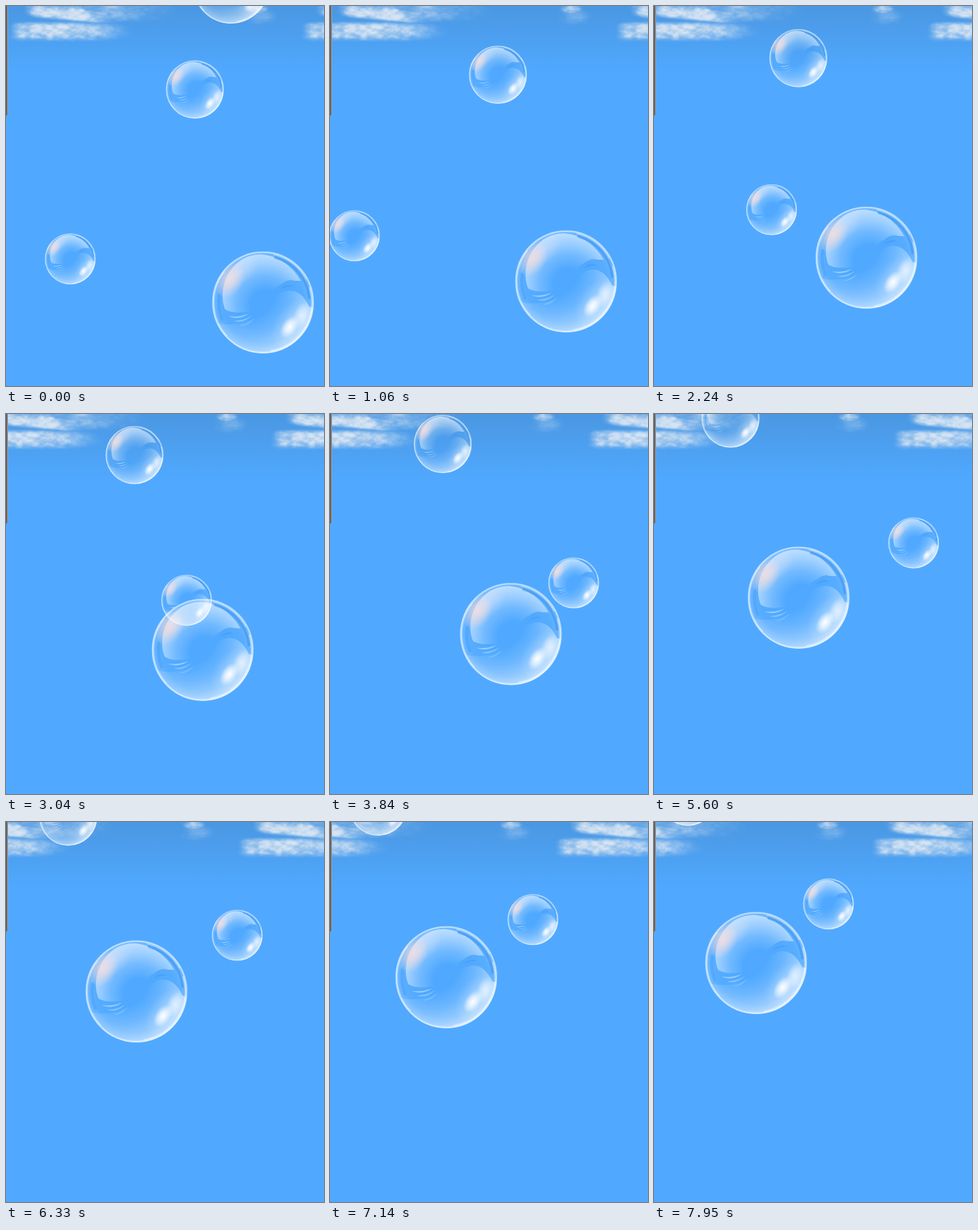
An HTML page with a canvas that plays this animation: 470x560 px, repeating every 8000 ms.

```html
<!DOCTYPE html>
<html lang="en">
<head>
<meta charset="utf-8">
<title>Bubbles in the sky</title>
<style>
html, body { margin: 0; width: 100%; height: 100%; overflow: hidden; background: #50a9ff; }
canvas { display: block; }
</style>
</head>
<body>
<canvas id="stage" width="470" height="560"></canvas>
<script>
const W = 470, H = 560, LOOP = 8000, TAU = Math.PI * 2;
const ctx = document.getElementById('stage').getContext('2d');

// Whole ticks so far; they come a little slower after six seconds
function ticks(t) {
  return Math.floor(Math.min(t, 6000) / 78 + Math.max(0, t - 6000) / 88.5 + 0.42);
}

// Distance travelled: the first move is a short one
const drift = t => Math.max(0, ticks(t) - 0.7) * 2.33;

// Leftward, then back to the right at double speed, then left again
const bounce = d => Math.max(95 - 1.9 * d, Math.min(4 * d - 90, 716 - 2 * d));

const clamp = v => Math.max(0, Math.min(1, v));
const smooth = (a, b, v) => { const k = clamp((v - a) / (b - a)); return k * k * (3 - 2 * k); };
const white = a => `rgba(255,255,255,${a})`;

function hash(x, y) {
  const s = Math.sin(x * 127.1 + y * 311.7) * 43758.5453;
  return s - Math.floor(s);
}

function noise(x, y) {
  const i = Math.floor(x), j = Math.floor(y);
  const u = smooth(0, 1, x - i), v = smooth(0, 1, y - j);
  const top = hash(i, j) * (1 - u) + hash(i + 1, j) * u;
  const low = hash(i, j + 1) * (1 - u) + hash(i + 1, j + 1) * u;
  return top * (1 - v) + low * v;
}

function fbm(x, y) {
  let sum = 0, amp = 0.5;
  for (let k = 0; k < 5; k++, amp /= 2) {
    sum += amp * noise(x, y);
    x = x * 2.03 + 7; y = y * 2.03 + 3;
  }
  return sum;
}

const TILE = 432, TILE_H = 62;

// A flat bank of cloud, thinning out to the right
function bank(x, y, left, right, mid, half) {
  const across = smooth(left, left + 30, x) * (1 - smooth(left + 90, right, x));
  return across * (1 - smooth(0.35, 1.25, Math.abs(y - mid) / half));
}

function cover(x, y) {
  const upper = bank(x, y, 18, 185, 4 + (x - 28) * 0.1, 12);
  const lower = bank(x, y, -4, 215, 37, 15);
  const wisp = 0.55 * bank(x, y, 70, 290, 4, 22);
  const puff = 0.95 * (1 - smooth(0, 24, Math.hypot(x - 371, (y - 3) * 1.8)));
  const haze = 0.5 * (1 - smooth(0, 40, Math.hypot(x - 376, (y - 16) * 2)));
  return Math.max(upper, lower, wisp, puff, haze);
}

function makeClouds() {
  const c = document.createElement('canvas');
  c.width = TILE; c.height = TILE_H;
  const g = c.getContext('2d'), img = g.createImageData(TILE, TILE_H);
  for (let y = 0; y < TILE_H; y++) {
    for (let x = 0; x < TILE; x++) {
      const body = cover(x, y);
      const n = fbm(x / 26, (y - x * 0.14) / 9);
      const fine = fbm(x / 8 + 40, y / 5 + 9);
      const a = smooth(0.05, 0.95, body * (0.35 + 0.65 * n + 0.35 * fine));
      const light = smooth(0.25, 0.7, 0.55 * n + 0.45 * fine);
      const rgba = [172 + 62 * light, 203 + 36 * light, 235 + 9 * light, 225 * a];
      img.data.set(rgba, (y * TILE + x) * 4);
    }
  }
  g.putImageData(img, 0, 0);
  return c;
}
const clouds = makeClouds();

function radial(x, y, r0, r1, stops, rgb = '255,255,255') {
  const g = ctx.createRadialGradient(x, y, r0, x, y, r1);
  stops.forEach(([p, a]) => g.addColorStop(p, `rgba(${rgb},${a})`));
  return g;
}

function glow(x, y, rx, ry, turn, alpha, rgb) {
  ctx.save();
  ctx.translate(x, y);
  ctx.rotate(turn);
  ctx.scale(rx, ry);
  ctx.fillStyle = radial(0, 0, 0, 1, [[0, alpha], [0.45, alpha * 0.65], [1, 0]], rgb);
  ctx.fillRect(-1, -1, 2, 2);
  ctx.restore();
}

function arc(r, from, to, width, color) {
  ctx.beginPath();
  ctx.arc(0, 0, r, from, to);
  ctx.lineWidth = width;
  ctx.strokeStyle = color;
  ctx.stroke();
}

// A thin curved blade, sagging down for a positive bend
function feather(x, y, dx, dy, bend, color) {
  ctx.beginPath();
  ctx.moveTo(x, y);
  ctx.quadraticCurveTo(x + dx / 2, y + dy / 2 + bend, x + dx, y + dy);
  ctx.quadraticCurveTo(x + dx / 2, y + dy / 2 + bend * 2.2, x, y);
  ctx.fillStyle = color;
  ctx.fill();
}

const UPPER = new Path2D('M-.74 .14C-.92 -.3 -.62 -.94 -.04 -.94C.28 -.92 .58 -.72 .74 -.42' +
  'C.6 -.43 .42 -.42 .26 -.3C.1 -.02 -.1 .14 -.28 .18C-.45 .21 -.62 .21 -.74 .14Z');
const LOWER = new Path2D('M.18 0C.32 -.28 .72 -.36 .9 .08L.98 .1A.98 .98 0 0 1 -.9 .4' +
  'C-.5 .5 -.1 .35 .18 0Z');

function bubble(x, y, r) {
  if (y < -r || x < -r) return;
  ctx.save();
  ctx.translate(x, y);
  ctx.scale(r, r);
  ctx.beginPath();
  ctx.arc(0, 0, 1, 0, TAU);
  ctx.clip();

  ctx.fillStyle = radial(0, 0, 0.5, 1, [[0, 0], [0.6, 0.04], [0.88, 0.15], [1, 0.36]]);
  ctx.fillRect(-1, -1, 2, 2);

  // sheens
  ctx.fillStyle = radial(0.05, 0.05, 0.3, 1, [[0, 0], [0.4, 0.2], [0.75, 0.45], [1, 0.56]]);
  ctx.fill(UPPER);
  ctx.fillStyle = radial(-0.3, -0.25, 0.55, 1.35, [[0, 0], [0.4, 0.16], [0.75, 0.36], [1, 0.54]]);
  ctx.fill(LOWER);
  glow(-0.66, -0.44, 0.27, 0.38, 0.55, 0.75, '255,222,216');
  glow(-0.45, -0.62, 0.42, 0.26, -0.7, 0.25, '255,236,240');

  // blue gaps beside the rim
  ctx.lineCap = 'round';
  arc(0.91, -1.3, -0.1, 0.05, 'rgba(62,148,238,.6)');
  arc(0.87, 2.75, 3.3, 0.06, 'rgba(72,160,250,.5)');

  // feathered streaks
  for (let i = 0; i < 3; i++) {
    feather(-0.68 + i * 0.11, 0.27 + i * 0.09, 0.4 - i * 0.05, -0.05 - i * 0.05, 0.05,
      `rgba(205,230,255,${0.6 - i * 0.16})`);
  }
  for (let i = 0; i < 2; i++) {
    feather(0.36 - i * 0.03, -0.35 + i * 0.1, 0.28, -0.06, -0.05, 'rgba(65,150,240,.55)');
  }

  // bright spots
  glow(0.52, 0.48, 0.15, 0.25, 0.6, 1);
  glow(0.76, 0.25, 0.16, 0.27, 0.35, 0.65);
  glow(0.6, 0.42, 0.36, 0.55, 0.65, 0.25);

  // rim
  arc(0.98, 0, TAU, 0.026, white(0.45));
  arc(0.96, -0.3, 1.4, 0.035, white(0.38));
  arc(0.965, 2.4, 3.8, 0.03, white(0.3));
  arc(0.96, -1.35, -0.5, 0.025, white(0.35));
  ctx.restore();
}

const sky = ctx.createLinearGradient(0, 0, 0, 98);
sky.addColorStop(0, '#4a97e2');
sky.addColorStop(1, '#50a9ff');

function draw(time) {
  const d = drift(time);
  ctx.fillStyle = sky;
  ctx.fillRect(0, 0, W, H);

  for (let x = -Math.round(d / 2); x < W; x += TILE) ctx.drawImage(clouds, x, 0);

  ['#5a6068', '#6f6f70', '#a39c94'].forEach((color, x) => {
    ctx.fillStyle = color;
    ctx.fillRect(x, 0, 1, 161);
  });

  bubble(332.5 - d, -30.5 - d, 56.5);
  bubble(279.2 - d, 123 - 0.7 * d, 43);
  bubble(379.9 - d, 436.8 - d, 75.4);
  bubble(bounce(d), 372.7 - 1.1 * d, 37.7);
}

const start = performance.now();
function loop() {
  draw((performance.now() - start) % LOOP);
  requestAnimationFrame(loop);
}
loop();
</script>
</body>
</html>
```
